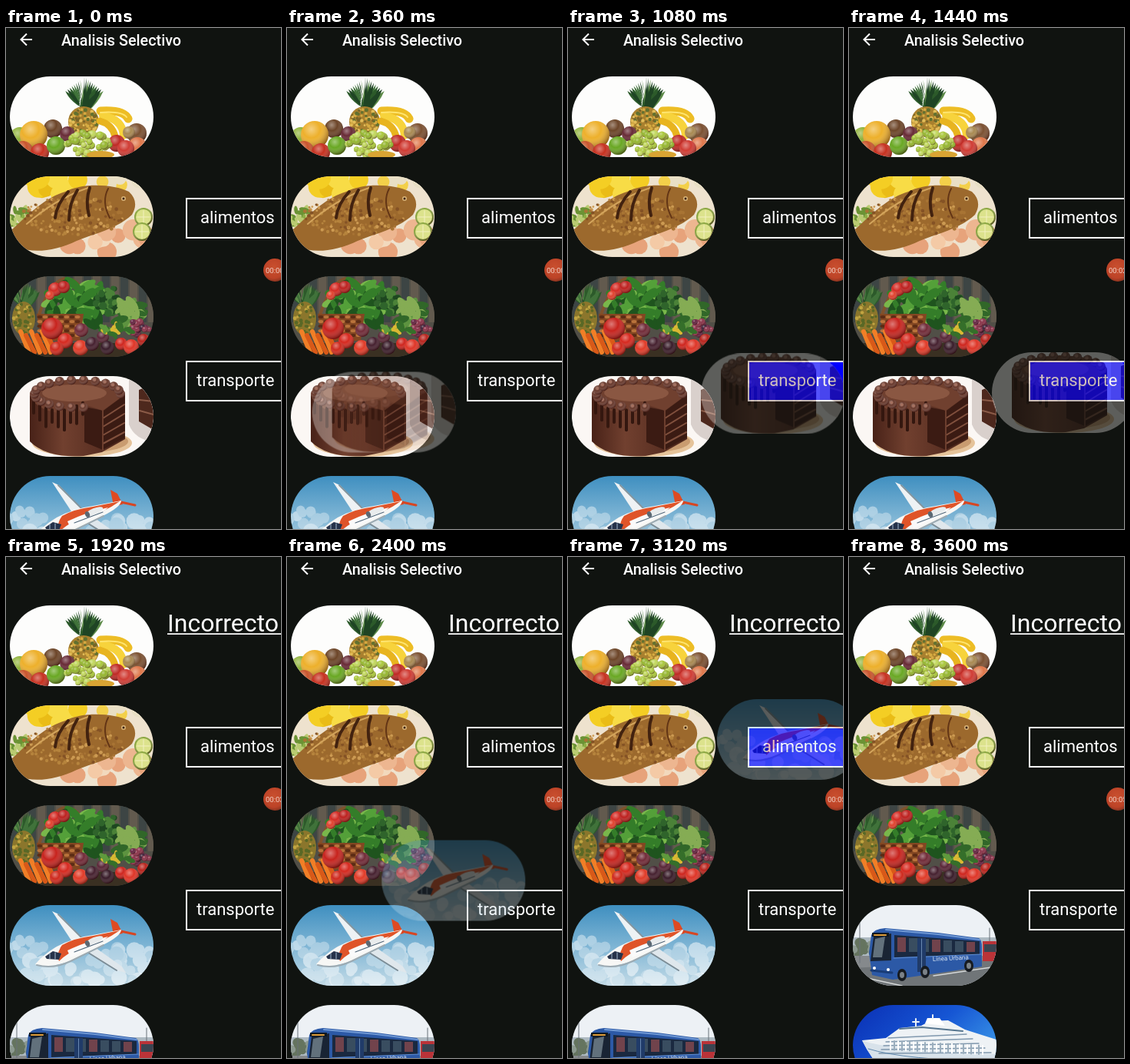
Write an HTML page that moves like this. It is 358 px wide and 652 px high and loops after 3.66 s.

```html
<!DOCTYPE html>
<html lang="es">
<head>
<meta charset="utf-8">
<title>Analisis Selectivo</title>
<style>
html, body { margin: 0; width: 100%; height: 100%; overflow: hidden; background: #101310; }
svg { display: block; font-family: Roboto, sans-serif; fill: #fff; }
.show { animation: 3660ms step-end infinite; }
.move { animation: 3660ms linear infinite; opacity: .33; }
#listA { animation-name: first; }
#listB { animation-name: second; }
#listC { animation-name: third; }
#result { animation-name: result; }
#hitLow { animation-name: hitLow; }
#hitHigh { animation-name: hitHigh; }
#dragCake { animation-name: dragCake; }
#dragPlane { animation-name: dragPlane; }
#dragCake .move { animation-name: cakePath; }
#dragPlane .move { animation-name: planePath; }
@keyframes first { 0% { visibility: visible } 47.54%, to { visibility: hidden } }
@keyframes second { 0% { visibility: hidden } 47.54% { visibility: visible } 93.44%, to { visibility: hidden } }
@keyframes third { 0% { visibility: hidden } 93.44%, to { visibility: visible } }
@keyframes result { 0% { visibility: hidden } 47.54%, to { visibility: visible } }
@keyframes hitLow { 0% { visibility: hidden } 16.4% { visibility: visible } 47.54%, to { visibility: hidden } }
@keyframes hitHigh { 0% { visibility: hidden } 77.87% { visibility: visible } 93.44%, to { visibility: hidden } }
@keyframes dragCake { 0% { visibility: hidden } 8.2% { visibility: visible } 47.54%, to { visibility: hidden } }
@keyframes dragPlane { 0% { visibility: hidden } 59.02% { visibility: visible } 93.44%, to { visibility: hidden } }
@keyframes cakePath {
  0%, 8.2% { transform: translate(5px, 453px) }
  11.5% { transform: translate(60px, 442px) }
  14.75% { transform: translate(125px, 430px) }
  18% { transform: translate(157px, 425px) }
  19.67% { transform: translate(160px, 425px) }
  39.34%, to { transform: translate(186px, 422px) }
}
@keyframes planePath {
  0%, 59.02% { transform: translate(5px, 453px) }
  65.57% { transform: translate(123px, 369px) }
  68.85% { transform: translate(152px, 318px) }
  73.77% { transform: translate(176px, 256px) }
  78.69% { transform: translate(188px, 215px) }
  85.25% { transform: translate(194px, 185px) }
  90.16%, to { transform: translate(198px, 163px) }
}
</style>
</head>
<body>
<svg width="358" height="652" viewBox="0 0 358 652">
  <defs>
    <clipPath id="pill"><rect width="187" height="105" rx="52.5"/></clipPath>
    <radialGradient id="shade" cx=".38" cy=".3" r=".7">
      <stop stop-color="#fff" stop-opacity=".4"/>
      <stop offset=".45" stop-color="#fff" stop-opacity="0"/>
      <stop offset="1" stop-color="#200" stop-opacity=".45"/>
    </radialGradient>
    <linearGradient id="sky" x2="0" y2="1">
      <stop stop-color="#3f8fc0"/><stop offset=".5" stop-color="#7db4d4"/><stop offset="1" stop-color="#c3dbe7"/>
    </linearGradient>
    <linearGradient id="deep" x2="1" y2=".6">
      <stop stop-color="#0a2fb4"/><stop offset=".55" stop-color="#1656d4"/><stop offset="1" stop-color="#3d9ae8"/>
    </linearGradient>
    <linearGradient id="choc" x2="1" y2="0">
      <stop stop-color="#482218"/><stop offset=".35" stop-color="#71402f"/><stop offset="1" stop-color="#4a241a"/>
    </linearGradient>
    <radialGradient id="rec" cx=".45" cy=".4" r=".6">
      <stop stop-color="#c9502f"/><stop offset=".75" stop-color="#bd4327"/><stop offset="1" stop-color="#8f3520"/>
    </radialGradient>
  </defs>
  <defs id="pics"></defs>

  <path d="M34 15H20M27 7.5 19.5 15l7.5 7.5" fill="none" stroke="#fff" stroke-width="2"/>
  <text x="72" y="23" font-size="19.8" font-weight="500">Analisis Selectivo</text>

  <use href="#fruit" x="5" y="63"/>
  <use href="#fish" x="5" y="193"/>
  <use href="#veg" x="5" y="323"/>
  <g class="show" id="listA"><use href="#cake" x="5" y="453"/><use href="#plane" x="5" y="583"/></g>
  <g class="show" id="listB"><use href="#plane" x="5" y="453"/><use href="#bus" x="5" y="583"/></g>
  <g class="show" id="listC"><use href="#bus" x="5" y="453"/><use href="#ship" x="5" y="583"/></g>

  <g class="show" id="result">
    <text x="210" y="97" font-size="32">Incorrecto</text>
    <path d="M210 100.2h148" stroke="#fff" stroke-width="1.8"/>
  </g>

  <rect class="show" id="hitHigh" x="235" y="222" width="140" height="51" fill="#00f"/>
  <rect class="show" id="hitLow" x="235" y="434" width="140" height="51" fill="#00f"/>
  <g fill="none" stroke="#fff" stroke-width="2">
    <rect x="235" y="222" width="140" height="51"/>
    <rect x="235" y="434" width="140" height="51"/>
  </g>
  <g font-size="22">
    <text x="253" y="254">alimentos</text>
    <text x="248" y="466">transporte</text>
  </g>

  <g class="show" id="dragCake"><use class="move" href="#cake"/></g>
  <g class="show" id="dragPlane"><use class="move" href="#plane"/></g>

  <circle cx="350" cy="315" r="15" fill="url(#rec)"/>
  <text id="clock" x="338" y="318.5" font-size="9.5" fill="#f3d3c8">00:00</text>
</svg>
<script>
let seed = 7;
const rnd = () => (seed = seed * 16807 % 2147483647) / 2147483647;
const pick = list => list[Math.floor(rnd() * list.length)];
const oval = (x, y, rx, ry, fill, turn = 0) =>
  `<ellipse cx="${x}" cy="${y}" rx="${rx}" ry="${ry}" fill="${fill}" transform="rotate(${turn} ${x} ${y})"/>`;
const dot = (x, y, r, fill) => oval(x, y, r, r, fill);
const ball = (x, y, r, fill) => dot(x, y, r, fill) + dot(x, y, r, 'url(#shade)');
const box = (x, y, w, h, fill) => `<rect x="${x}" y="${y}" width="${w}" height="${h}" fill="${fill}"/>`;
const shape = (d, fill) => `<path d="${d}" fill="${fill}"/>`;
const line = (d, color, w = 1) => `<path d="${d}" fill="none" stroke="${color}" stroke-width="${w}" stroke-linecap="round"/>`;
const repeat = (n, fn) => Array.from({ length: n }, (_, i) => fn(i)).join('');
const back = fill => box(0, 0, 187, 105, fill);

// Random blobs inside an ellipse.
const cluster = (n, x, y, rx, ry, r, colors, draw = dot) => repeat(n, () => {
  const a = rnd() * 2 * Math.PI, k = Math.sqrt(rnd());
  return draw(x + rx * k * Math.cos(a), y + ry * k * Math.sin(a), r * (.7 + rnd() * .6), pick(colors));
});
const leaf = (x, y, r, fill) => oval(x, y, r * 1.6, r * .7, fill, rnd() * 180);
const crown = (x, y, size) => repeat(19, i => {
  const a = (i * 7 % 19 - 9) / 9, len = size * (1 - Math.abs(a) * .42);
  const tx = x + a * size * .55, ty = y - len;
  return shape(`M${x - 5} ${y}Q${x + a * 6} ${y - len * .6} ${tx} ${ty}Q${x + a * 18} ${y - len * .4} ${x + 5} ${y}Z`,
    pick(['#2c5a2a', '#40723a', '#1f4424', '#5c8a48']));
});
const cloud = (n, x, y, rx, ry) => `<g opacity=".5">${cluster(n, x, y, rx, ry, 8, ['#fff', '#e4eff5', '#d3e5ef'])}</g>`;

const pics = {
  fruit: () => back('#fdfdfc') +
    crown(97, 45, 45) + oval(96, 59, 20, 20, '#a9802e') +
    cluster(75, 96, 59, 18, 17, 2, ['#d6ab42', '#7a6428', '#e2bc58', '#62702f']) +
    line('M118 45Q148 43 154 55', '#edbd25', 11) + line('M121 51Q147 56 148 77', '#f7d33c', 10) +
    line('M117 58Q133 62 137 78', '#e8b41f', 9) + line('M118 47Q146 45 152 53', '#ffe570', 2) +
    ball(165, 74, 13, '#7b5132') + ball(155, 73, 8, '#a98a52') + ball(13, 79, 13, '#8fb23a') +
    ball(56, 68, 12, '#6c4528') + ball(31, 76, 18, '#edb02b') + ball(75, 75, 10, '#682b36') +
    ball(17, 97, 13, '#c9542c') + ball(39, 99, 12, '#c63120') + ball(60, 90, 12, '#69a823') +
    ball(166, 91, 12, '#df774a') + ball(139, 87, 11, '#bf2a25') + ball(151, 94, 11, '#d03c34') +
    cluster(46, 101, 88, 29, 15, 4.6, ['#a9c73b', '#94b52e', '#c1d85c'], ball) +
    oval(118, 102, 18, 5, '#d9a433'),

  fish: () => back('#eee2ce') +
    cluster(15, 53, 12, 52, 15, 12, ['#f4ce24', '#eabc16', '#f8dc46']) +
    cluster(10, 138, 5, 35, 8, 9, ['#f3d04a', '#e9dfc5']) +
    cluster(22, 12, 54, 14, 12, 4, ['#8cac45', '#bacb72', '#6b9334'], leaf) +
    cluster(14, 125, 83, 58, 18, 11, ['#edb690', '#f4caa6', '#e7a37b', '#f2d9bd']) +
    shape('M2 70C24 50 45 28 72 20C95 8 135 10 155 20Q169 33 159 50C140 68 112 74 87 84C60 97 30 101 12 92Q4 82 2 70Z', '#9c692d') +
    cluster(180, 82, 52, 68, 25, 1.9, ['#b6843d', '#845225', '#cc9a52', '#a87434']) +
    line('M22 62Q60 29 102 15', '#d3a45c', 2) +
    line('M76 20Q61 36 59 54', '#42220f', 4) + line('M88 18Q77 35 77 57', '#42220f', 4) +
    line('M104 15Q98 32 103 51', '#42220f', 4) + line('M128 16Q119 33 130 54', '#633515', 2) +
    dot(148, 29, 3, '#d9b57a') + dot(148, 29, 1.5, '#3a2010') +
    [[174, 53], [172, 72]].map(([x, y]) =>
      ball(x, y, 12, '#87a43b') + dot(x, y, 10, '#dce28c') + line(`M${x - 8} ${y}h16M${x} ${y - 8}v16`, '#f3f0c0')).join(''),

  veg: () => back('#514f47') +
    repeat(16, i => box(i * 12, 0, 10, 60, i % 2 ? '#625a4e' : '#3d4544')) +
    crown(18, 42, 38) + oval(18, 55, 15, 22, '#8b762c') + cluster(40, 18, 55, 13, 20, 2, ['#c1a541', '#596826']) +
    line('M38 50Q70 -42 113 46', '#80522c', 4) +
    cluster(80, 89, 37, 39, 29, 7, ['#347d29', '#54a039', '#1f541e', '#79b74b'], leaf) +
    ball(59, 17, 9, '#d42b24') + ball(70, 14, 8, '#bd211f') + ball(52, 25, 6, '#e1412d') +
    shape('M35 49H96L91 84H41Z', '#834722') +
    repeat(5, j => repeat(8, i => oval(39 + i * 7, 53 + j * 6, 3.5, 2, (i + j) % 2 ? '#b9733b' : '#5c2c15'))) +
    cluster(50, 129, 32, 17, 18, 4, ['#2f642b', '#4b8238', '#1e4720']) +
    cluster(30, 158, 49, 18, 17, 6, ['#5d9340', '#316729', '#85ac54'], leaf) +
    cluster(24, 169, 67, 14, 10, 4, ['#642240', '#8a3148', '#3b1c33'], ball) +
    box(0, 87, 187, 18, '#3a3022') +
    repeat(6, i => line(`M${14 + i * 7} ${72 + i % 2 * 5}L${25 + i * 7} 99`, i % 2 ? '#d95918' : '#f17f27', 6)) +
    ball(55, 68, 14, '#c7231d') + ball(72, 84, 10, '#d6291f') + ball(92, 93, 10, '#e13b28') + ball(61, 94, 9, '#cf2a1e') +
    ball(93, 70, 9, '#712b38') + ball(107, 88, 9, '#45202f') + ball(121, 79, 8, '#592637') + ball(127, 93, 9, '#381c29') +
    ball(145, 88, 8, '#cf251e') + ball(158, 92, 10, '#df3527') + ball(174, 83, 8, '#b8241d') +
    cluster(20, 140, 70, 23, 7, 4, ['#5f9a3d', '#d9b833', '#356f2a'], leaf),

  cake: () => back('#fbf7f4') +
    shape('M155 0h32v85q-24-2-32-22Z', '#d9d0cc') + shape('M168 18L187 10V70L168 59Z', '#4d281d') +
    line('M169 31l18 2M169 45l18 5', '#8b5b48', 2) +
    oval(94, 87, 65, 18, '#e5c39a') + oval(94, 85, 60, 15, '#c99c70') +
    shape('M26 25V85Q48 107 96 104L120 99L150 82V24Z', 'url(#choc)') +
    shape('M97 40L122 45L150 24V80L121 96L97 86Z', '#3b1b13') +
    repeat(4, i => line(`M121 ${55 + i * 11}L149 ${37 + i * 12}`, '#81503d', 2)) +
    line('M121 45V96', '#6c3e2e', 2) +
    shape('M26 25Q28 7 88 4Q148 6 150 24L121 45L97 37Q93 49 75 49Q35 47 26 25Z', '#70402f') +
    oval(84, 22, 42, 11, '#8a5742') +
    repeat(9, i => line(`M${31 + i * 8} ${34 + Math.sin(i / 2.6) * 11}v${14 + i * 5 % 13}`, '#34170f', 4)) +
    repeat(22, i => {
      const a = i / 22 * 2 * Math.PI, x = 88 + 56 * Math.cos(a), y = 23 + 18 * Math.sin(a);
      return x > 101 && y > 28 ? '' : ball(x, y, 6, '#68392c') + dot(x - 1, y - 2, 2, '#a57160');
    }),

  plane: () => back('url(#sky)') +
    cloud(24, 30, 90, 55, 20) + cloud(25, 148, 73, 45, 23) + cloud(10, 22, 52, 28, 12) + cloud(10, 130, 98, 60, 8) +
    shape('M55 8L64 12L94 43L82 49Z', '#eef2f4') + line('M63 12L94 43', '#83959e', 2) +
    shape('M98 60L108 53L146 80L151 88L139 85Z', '#dfe7ec') + line('M99 60L139 85', '#7b8c96', 2) +
    shape('M131 18L140 23L147 37L135 39Z', '#df4a22') + line('M140 33L163 38', '#d74622', 3) +
    shape('M33 77Q44 64 61 54Q84 42 108 39L145 32Q145 40 121 52L78 73Q45 84 33 77Z', '#f7f7f5') +
    shape('M68 52Q84 43 108 40L143 33Q121 49 91 56Q75 62 64 73Q60 63 68 52Z', '#df5429') +
    shape('M75 59Q100 47 128 41Q115 53 79 68Z', '#fafafa') +
    line('M84 61Q105 53 121 47', '#51677a', 1.2) +
    shape('M46 67L56 60L67 63L64 71L48 70Z', '#25324a') + line('M52 63v7M59 62v8', '#a4b9cf') +
    line('M35 78Q56 84 79 73L122 52', '#9caab2', 2) +
    oval(110, 46, 12, 4, '#e9eced', -22) + oval(101, 50, 3, 4, '#5b6873', -22),

  bus: () => back('#edf1f5') +
    box(0, 42, 187, 25, '#aebac2') + cluster(25, 16, 56, 25, 8, 5, ['#65745f', '#8c9990']) + box(0, 66, 187, 39, '#85898c') +
    shape('M0 82L187 71V105H0Z', '#707578') + line('M0 91L64 105M105 92L187 80', '#d5d8d8', 1.5) +
    line('M9 23V75M178 30V73', '#687078') + box(169, 47, 18, 26, '#ba3338') + box(171, 51, 16, 10, '#3a4451') +
    shape('M24 39Q27 31 42 30L111 36L164 43Q168 45 168 55V80L101 90L52 97L25 91L21 62Z', '#2c59a6') +
    shape('M27 41L50 37V72L23 73Z', '#192434') + shape('M29 44L42 41L38 68L26 68Z', '#62717c') +
    shape('M54 39L165 47V64L54 68Z', '#1a2940') +
    repeat(7, i => shape(`M${58 + i * 15} ${42 + i}h11v${19 - i}h-11Z`, i % 3 ? '#394d60' : '#71434c')) +
    line('M43 32L111 38L165 45', '#6f98d4', 2) + line('M53 69L167 64', '#6290d3') +
    box(84, 43, 11, 44, '#203b69') + line('M89.500 44V86', '#6988b0') +
    box(25, 36, 22, 5, '#101820') + line('M28 39h15', '#df9c38', 2) +
    line('M24 85l27 3', '#193c76', 3) + dot(28, 82, 2, '#fff') + dot(46, 84, 2, '#fff') +
    [[64, 91], [94, 87], [151, 79]].map(([x, y]) => oval(x, y, 6, 8, '#171b20') + oval(x, y, 3, 4, '#7b8288')).join('') +
    '<text transform="translate(104 73) rotate(-3)" font-size="8" fill="#dce8f5">Línea Urbana</text>',

  ship: () => back('url(#deep)') +
    box(0, 77, 187, 28, '#176fb5') + line('M0 82H187M12 90H171', '#5fa9d7') +
    shape('M12 46L43 43L61 30L89 27L100 21L124 20L146 32L171 40L187 45V76L168 90H45Q25 73 12 46Z', '#eef2f5') +
    shape('M12 46Q42 58 187 64V78L166 90H45Q25 73 12 46Z', '#d8e2ea') +
    repeat(5, j => line(`M${46 - j * 3} ${43 + j * 5}L${148 + j * 8} ${38 + j * 6}`, '#8098ae', 1.3)) +
    repeat(25, i => box(48 + i * 5, 46 + i * .25, 2, 13, i % 2 ? '#9baebd' : '#fff')) +
    shape('M94 24L97 17H113L120 27Z', '#fff') + line('M82 28V18M78 22h8M104 18v-5', '#eaf1f8', 2) +
    line('M61 31L90 29L143 34', '#57768f', 2) + line('M20 57Q68 72 187 73', '#5e87ac')
};

document.getElementById('pics').innerHTML = Object.entries(pics)
  .map(([id, draw]) => `<g id="${id}" clip-path="url(#pill)">${draw()}</g>`).join('');

// The recorder clock runs faster than the loop.
const clock = document.getElementById('clock');
function tick() {
  const t = performance.now() % 3660 / 1000;
  clock.textContent = '00:0' + Math.max(0, Math.floor(t * 1.68 - .215));
  requestAnimationFrame(tick);
}
tick();
</script>
</body>
</html>
```
